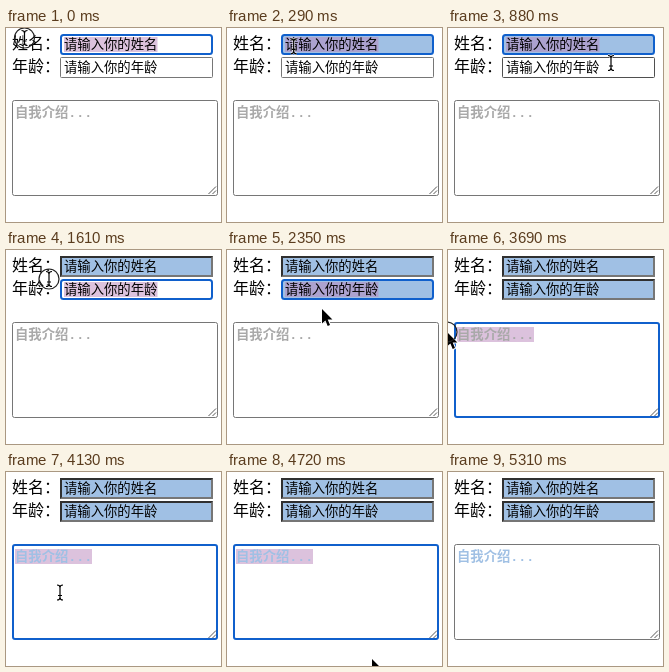
Write an HTML page with a canvas that moves like this. It is 215 px wide and 194 px high and loops after 6.21 s.

```html
<!DOCTYPE html>
<html lang="zh-CN">
<head>
<meta charset="utf-8">
<title>表单选择</title>
<style>
html, body { margin: 0; width: 215px; height: 194px; overflow: hidden; background: #fff; }
canvas { display: block; }
</style>
</head>
<body>
<canvas id="stage" width="215" height="194"></canvas>
<script>
const ctx = document.getElementById('stage').getContext('2d');
const LOOP = 6210, TICK = 147.2;
const SANS = '"Noto Sans CJK SC", "Noto Sans CJK", sans-serif';
const MONO = '"Liberation Mono", "Noto Sans CJK SC", "Noto Sans CJK", monospace';
const BLUE = '#a0c0e4', FOCUS = '#1060cc', PICK = 'rgba(185,133,187,.5)';

// Pointer path: [tick, x, y]
const path = [
  [0, 18.5, 10], [6, 163, 35], [8, 163, 37], [11, 43, 29], [12, 46, 33],
  [15, 95, 60], [16, 95, 59], [17, 95, 59], [21, 98, 84], [22, 98, 84],
  [25, -1, 82], [26, 4, 84], [30, 104, 157], [32, 145, 187], [34, 145, 187], [35, 147, 191]
];

const within = (v, a, b) => v >= a && v <= b;

function pointer(n) {
  let i = 0;
  while (i < path.length - 2 && n > path[i + 1][0]) i++;
  const a = path[i], b = path[i + 1];
  const k = Math.min(1, (n - a[0]) / (b[0] - a[0]));
  return { x: a[1] + (b[1] - a[1]) * k, y: a[2] + (b[2] - a[2]) * k };
}

function text(s, x, y, font, color) {
  ctx.font = font;
  ctx.fillStyle = color;
  ctx.fillText(s, x, y);
}

function box(x, y, w, h, line, width, fill, r) {
  const d = width / 2;
  ctx.beginPath();
  ctx.roundRect(x + d, y + d, w - width, h - width, r);
  ctx.fillStyle = fill;
  ctx.fill();
  ctx.strokeStyle = line;
  ctx.lineWidth = width;
  ctx.stroke();
}

function inset(x, y, w, h, fill) {
  ctx.fillStyle = '#767676';
  ctx.fillRect(x, y, w, h);
  ctx.fillStyle = '#303030';
  ctx.beginPath();
  ctx.moveTo(x, y);
  ctx.lineTo(x + w, y);
  ctx.lineTo(x + w - 2, y + 2);
  ctx.lineTo(x + 2, y + 2);
  ctx.lineTo(x + 2, y + h - 2);
  ctx.lineTo(x, y + h);
  ctx.fill();
  ctx.fillStyle = fill;
  ctx.fillRect(x + 2, y + 2, w - 4, h - 4);
}

function select(from, start, end, y) {
  const x = Math.max(start, Math.min(end, from));
  ctx.fillStyle = PICK;
  ctx.fillRect(x, y, end - x, 15);
}

function field(y, label, value, focused, done, from, p) {
  text(label, 6, y + 15, '16px ' + SANS, '#000');
  const fill = done ? BLUE : '#fff';
  const hover = within(p.x, 54, 207) && within(p.y, y, y + 21);
  if (focused) box(54, y, 153, 21, FOCUS, 2, fill, 2.5);
  else if (done) inset(54, y, 153, 21, fill);
  else box(54, y, 153, 21, hover ? '#4f4f4f' : '#767676', 1, fill, 1);
  if (focused) select(from, 58, 151.5, y + 3);
  text(value, 58, y + 15, '13.333px ' + SANS, '#000');
}

function area(focused, done, from) {
  box(6, 72, 206, 96, focused ? FOCUS : '#767676', focused ? 2 : 1, '#fff', 2);
  ctx.strokeStyle = '#444';
  ctx.lineWidth = 0.9;
  ctx.beginPath();
  ctx.moveTo(202.5, 166);
  ctx.lineTo(210, 158.5);
  ctx.moveTo(206.5, 166);
  ctx.lineTo(210, 162.5);
  ctx.stroke();
  if (focused) select(from, 9, 86, 77);
  text('自我介绍...', 9, 89, 'bold 13.333px ' + MONO, done ? BLUE : '#a9a9a9');
}

function beam(x, y) {
  ctx.beginPath();
  ctx.moveTo(x - 3, y - 7.5);
  ctx.quadraticCurveTo(x, y - 7.5, x, y - 5);
  ctx.lineTo(x, y + 5);
  ctx.quadraticCurveTo(x, y + 7.5, x - 3, y + 7.5);
  ctx.moveTo(x + 3, y - 7.5);
  ctx.quadraticCurveTo(x, y - 7.5, x, y - 5);
  ctx.moveTo(x, y + 5);
  ctx.quadraticCurveTo(x, y + 7.5, x + 3, y + 7.5);
  ctx.moveTo(x - 2, y + 3);
  ctx.lineTo(x + 2, y + 3);
  for (const [color, w] of [['rgba(255,255,255,.8)', 2.6], ['#000', 1.2]]) {
    ctx.strokeStyle = color;
    ctx.lineWidth = w;
    ctx.stroke();
  }
}

function arrow(x, y) {
  const pts = [[0, 0], [0, 14.5], [3.4, 11.4], [5.7, 17], [8, 16], [5.7, 10.6], [10.4, 10.4]];
  ctx.beginPath();
  pts.forEach(([a, b]) => ctx.lineTo(x + a, y + b));
  ctx.closePath();
  ctx.lineJoin = 'round';
  ctx.strokeStyle = '#fff';
  ctx.lineWidth = 2;
  ctx.stroke();
  ctx.fillStyle = '#000';
  ctx.fill();
}

function cursor(n, p, pressed) {
  if (n >= 36) return;
  const overText = p.y < 50 || (p.x > 6 && within(p.y, 72, 168));
  (overText ? beam : arrow)(p.x, p.y);
  if (!pressed) return;
  ctx.beginPath();
  ctx.arc(p.x, p.y, 10, 0, Math.PI * 2);
  ctx.strokeStyle = '#222';
  ctx.lineWidth = 1.2;
  ctx.stroke();
}

function draw(now) {
  const n = Math.floor((now % LOOP + 10) / TICK);
  const p = pointer(n);
  const dragTwo = within(n, 8, 11), dragArea = within(n, 21, 25);
  ctx.fillStyle = '#fff';
  ctx.fillRect(0, 0, 215, 194);
  field(6, '姓名：', '请输入你的姓名', n < 8, n >= 1, 0, p);
  field(29, '年龄：', '请输入你的年龄', within(n, 8, 20), n >= 12, dragTwo ? p.x : 0, p);
  area(within(n, 21, 33), n >= 26, dragArea ? p.x : 0);
  cursor(n, p, n === 0 || dragTwo || dragArea || n === 34);
}

const begin = performance.now();
function frame() {
  draw(performance.now() - begin);
  requestAnimationFrame(frame);
}
frame();
</script>
</body>
</html>
```
